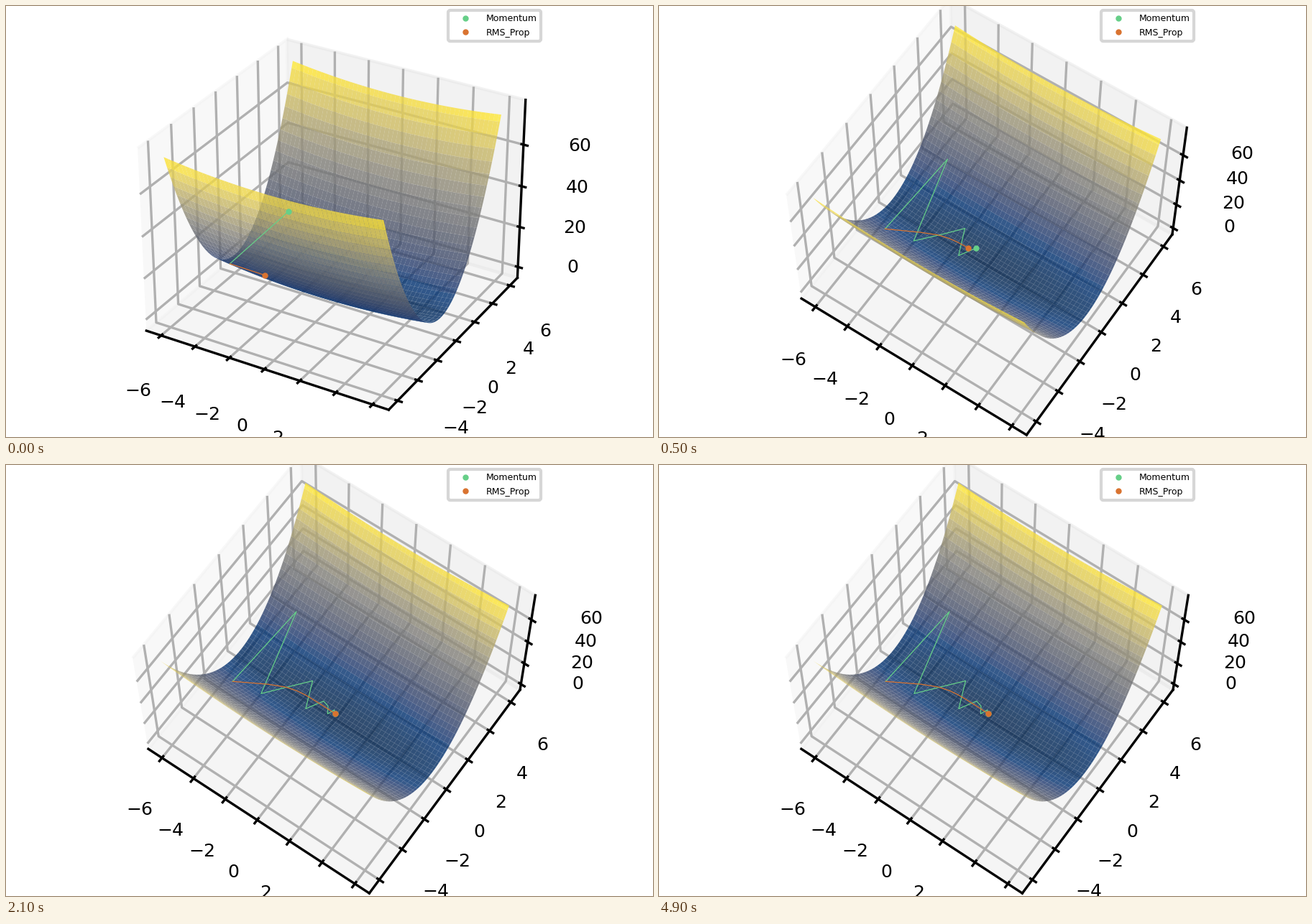
These frames come from a looping animation (900 px wide and 600 px high, 5000 ms). A matplotlib script:

```python
import numpy as np
import matplotlib.pyplot as plt
from matplotlib.animation import FuncAnimation

FRAMES, INTERVAL = 50, 100
START = np.array([-5.0, -2.0])
GREEN, ORANGE = "#66cf88", "#d97330"

# Camera (elevation, azimuth): one swing upwards, then it rests.
VIEWS = [(30, -60), (30.9, -60), (33.9, -60), (39, -59.7),
         (45.6, -59.4), (59.7, -56.2), (63.6, -55)]


def bowl(x, y):
    return 0.1 * x**2 + 2 * y**2


def grad(p):
    return np.array([0.2, 4.0]) * p


def momentum(steps, eta=0.6, beta=0.5):
    p, v = START.copy(), np.zeros(2)
    path = [p]
    for _ in range(steps):
        v = beta * v + grad(p)
        p = p - eta * v
        path.append(p)
    return np.array(path)


def rms_prop(steps, eta=0.4, gamma=0.9, eps=1e-6):
    p, s = START.copy(), np.zeros(2)
    path = [p]
    for _ in range(steps):
        g = grad(p)
        s = gamma * s + (1 - gamma) * g**2
        p = p - eta * g / np.sqrt(s + eps)
        path.append(p)
    return np.array(path)


def padded(lo, hi):
    pad = (hi - lo) * (0.05 + 1.1 / 48)
    return lo - pad, hi + pad


fig = plt.figure(figsize=(3, 2), dpi=300)
ax = fig.add_axes([0, 0, 1, 1], projection="3d", computed_zorder=False)

side = np.linspace(-6, 6, 100)
X, Y = np.meshgrid(side, side)
Z = bowl(X, Y)
ax.plot_surface(X, Y, Z, cmap="cividis", alpha=0.8, zorder=1)

ax.set_xlim(*padded(-6, 6))
ax.set_ylim(*padded(-6, 6))
ax.set_zlim(*padded(0, Z.max()))
ax.set_xticks(range(-6, 7, 2))
ax.set_yticks(range(-6, 7, 2))
ax.set_zticks(range(0, 61, 20))
ax.tick_params(labelsize=6)


def make_track(path, color, label, zorder):
    xyz = np.column_stack([path, bowl(path[:, 0], path[:, 1])])
    line, = ax.plot([], [], [], color=color, lw=0.3, zorder=zorder)
    dot, = ax.plot([], [], [], "o", color=color, ms=1, label=label,
                   zorder=zorder + 0.5)
    return xyz, line, dot


tracks = [make_track(momentum(FRAMES), GREEN, "Momentum", 3),
          make_track(rms_prop(FRAMES), ORANGE, "RMS_Prop", 4)]
ax.legend(loc="upper right", fontsize=3, handlelength=3)


def update(i):
    elev, azim = VIEWS[min(i, len(VIEWS) - 1)]
    ax.view_init(elev=elev, azim=azim)
    for xyz, line, dot in tracks:
        line.set_data_3d(*xyz[:i + 2].T)
        dot.set_data_3d(*xyz[i + 1:i + 2].T)
    return [artist for _, *pair in tracks for artist in pair]


ani = FuncAnimation(fig, update, frames=FRAMES, interval=INTERVAL,
                    init_func=lambda: update(0), repeat=True)
plt.show()
```
